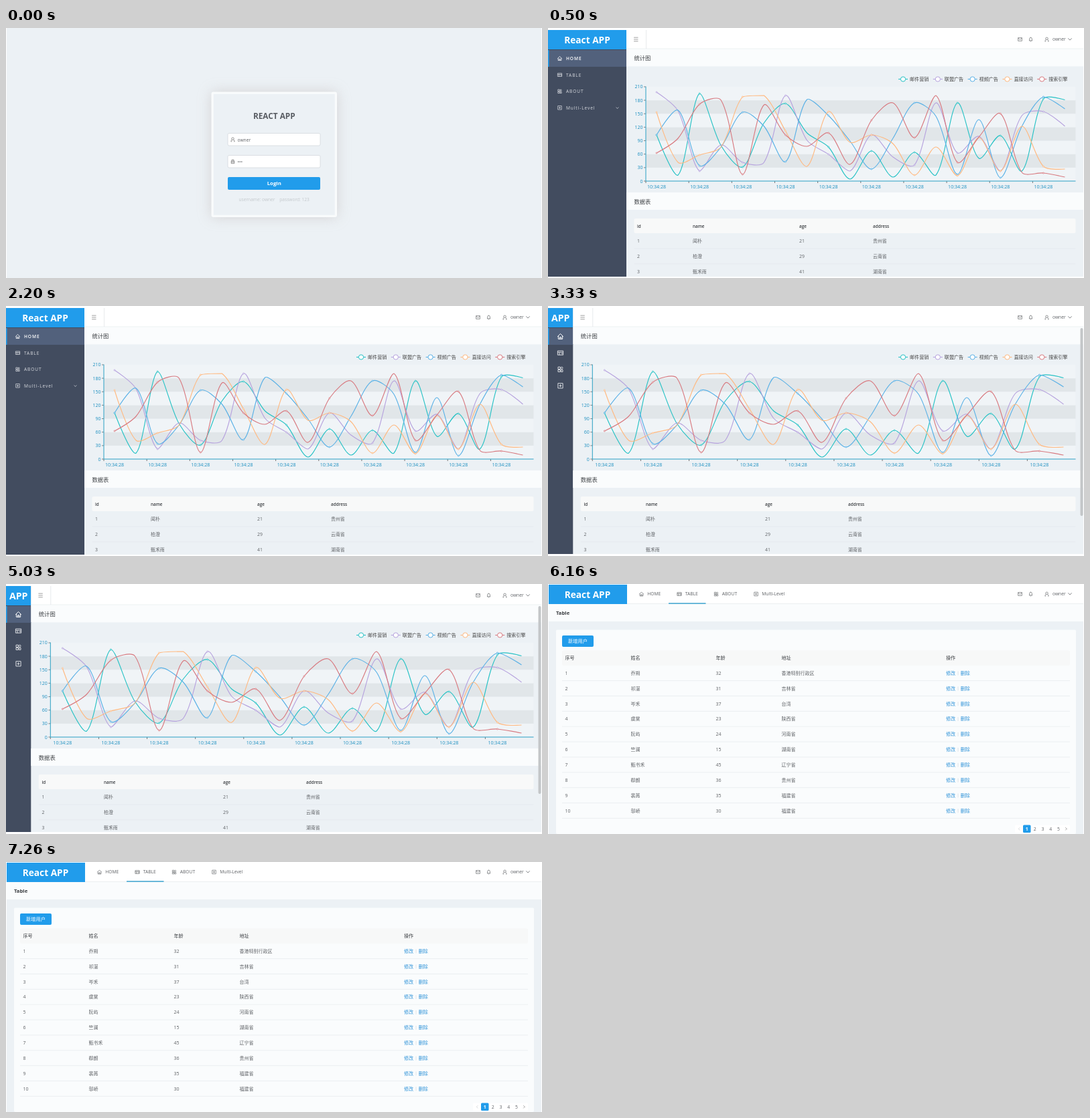
Animation, 800 px wide and 374 px high, one loop 8 s. Source, as an HTML page:

```html
<!DOCTYPE html>
<html lang="zh-CN">
<head>
<meta charset="utf-8">
<title>Dashboard</title>
<style>
html, body { margin: 0; width: 100%; height: 100%; overflow: hidden; background: #fff; }
svg { display: block; width: 100vw; height: 100vh; }
text { font-family: "Open Sans", "Noto Sans CJK SC", "Noto Sans CJK", sans-serif; white-space: pre; }
</style>
</head>
<body>
<svg id="stage" viewBox="0 0 800 374"></svg>
<script>
const BLUE = '#219ceb', BG = '#ecf1f5', PANEL = '#fafcfd', INK = '#5f6266', DARK = '#3c3f43';
const USER = 'owner';

const rect = (x, y, w, h, fill, extra = '') =>
  `<rect x="${x}" y="${y}" width="${w}" height="${h}" fill="${fill}" ${extra}/>`;
const text = (x, y, str, size = 6.7, fill = INK, extra = '') =>
  `<text x="${x}" y="${y}" font-size="${size}" fill="${fill}" ${extra}>${str}</text>`;
const line = (x1, y1, x2, y2, color, w = 0.7) =>
  `<path d="M${x1} ${y1}L${x2} ${y2}" stroke="${color}" stroke-width="${w}" fill="none"/>`;
const BOLD = 'font-weight="700"', SEMI = 'font-weight="600"', MEDIUM = 'font-weight="500"';
const MID = 'text-anchor="middle"', END = 'text-anchor="end"';

// Icons are drawn around 0,0 in a box of about 7 px
const ICONS = {
  home: 'M-3.4 .2L0-3.2L3.4 .2M-2.5-.5V3.1H2.5V-.5M-.8 3V.9H.8V3',
  table: 'M-3.3-2.4H3.3V2.5H-3.3ZM-3.3-.7H3.3M-1.2-.7V2.5M1 .9H3.3',
  about: 'M-2.8-2.8H-.2V-.2H-2.8ZM-2.8 .6H-.2V3H-2.8ZM.6-1.6A1.1 1.2 0 1 1 2.8-1.6A1.1 1.2 0 1 1 .6-1.6M.6 3V.6H2.8V3Z',
  plus: 'M-2.9-2.9H2.9V2.9H-2.9ZM-1.6 0H1.6M0-1.6V1.6',
  mail: 'M-3-2.5H3V2.5H-3ZM-3-2L0 .5L3-2',
  bell: 'M-2.7 2H2.7M-2 2V-.6A2 2.2 0 0 1 2-.6V2M-.7 3.1H.7M0-2.8V-3.5',
  user: 'M-1.8-1.2A1.8 1.9 0 1 1 1.8-1.2A1.8 1.9 0 1 1-1.8-1.2M-2.8 3.3Q-2.6 .7-1 .4M2.8 3.3Q2.6 .7 1 .4M-2.8 3.3H-1.7M2.8 3.3H1.7',
  lock: 'M-2.4-.8H2.4V3H-2.4ZM-1.5-.8V-2.8H1.5V-.8M-2.4 1H2.4',
  fold: 'M-3.2-2.8H3.2M-3.2 0H3.2M-3.2 2.8H3.2',
  down: 'M-2.4-1.2L0 1.3L2.4-1.2',
  left: 'M1-2L-1 0L1 2',
  right: 'M-1-2L1 0L-1 2'
};
const icon = (name, x, y, color = INK, s = 1, w = 0.7) =>
  `<path d="${ICONS[name]}" transform="translate(${x} ${y}) scale(${s})" fill="none" stroke="${color}" stroke-width="${w}"/>`;

const userBar = y =>
  icon('mail', 704.5, y, INK, .95) + icon('bell', 720.5, y, INK, .95) + icon('user', 744.5, y, INK, .95) +
  text(753, y + 2.4, USER, 6.7) + icon('down', 779, y - .3, INK, 1.1);

const band = (x, y, label) =>
  rect(x, y, 799 - x, 26, PANEL) + text(x + 11.5, y + 16.8, label, 8.3, DARK, MEDIUM);

function login() {
  const field = (y, name, value) =>
    rect(331, y, 138, 18.5, '#fff', 'rx="2" stroke="#d3d9dd" stroke-width=".8"') +
    icon(name, 338.5, y + 9.3, '#666', .95) + text(345.5, y + 12, value);
  return rect(1, 0, 798, 374, BG) +
    '<defs><filter id="soft" x="-30%" y="-30%" width="160%" height="160%"><feGaussianBlur stdDeviation="10"/></filter></defs>' +
    rect(306.5, 95.5, 187.5, 187.5, '#cac6c6', 'filter="url(#soft)" opacity=".7"') +
    rect(306.5, 95.5, 187.5, 187.5, '#f9fbfc', 'rx="3"') +
    rect(309.8, 98.8, 180.9, 180.9, BG) +
    text(400.3, 136.4, 'REACT APP', 11.8, '#595d63', BOLD + ' ' + MID) +
    field(157.5, 'user', USER) + field(190.5, 'lock', '•••') +
    rect(331, 223, 138, 19, BLUE, 'rx="2"') +
    text(400.3, 235.4, 'Login', 7.8, '#fff', BOLD + ' ' + MID) +
    text(347.5, 259.4, 'username: ' + USER, 6.6, '#c3c8cc') +
    text(408.3, 259.4, 'password: 123', 6.6, '#c3c8cc');
}

// Each series: name, color, heights on the stage
const SERIES = [
  ['邮件营销', '#27c2c5', [160, 220, 98, 176, 208, 142, 113, 157, 178, 226, 184, 223, 186, 220, 112, 195, 161, 214, 106, 107.5]],
  ['联盟广告', '#b6a2de', [96, 124, 214, 175, 201, 201, 101, 168, 189, 214, 160, 193, 205, 112, 187, 162, 214, 131, 125, 147]],
  ['视频广告', '#5ab1e6', [160, 123, 206, 178, 126, 147, 200, 107, 131, 169, 211, 165, 112, 132, 219, 137, 224, 147, 103, 121]],
  ['直接访问', '#ffb980', [126, 201, 190, 178, 103, 101, 154, 207, 125, 171, 160, 173, 220, 178, 221, 164, 214, 147, 207, 211]],
  ['搜索引擎', '#d87a80', [187, 165, 114, 108, 219, 115, 160, 177, 157, 204, 138, 112, 164, 101, 201, 163, 128, 216, 217, 223]]
];
const SMOOTH = 0.3;

// Smooth curve whose handles stay inside the range of the data
function curve(pts) {
  const ys = pts.map(p => p[1]), lo = Math.min(...ys), hi = Math.max(...ys);
  const clamp = y => Math.max(lo, Math.min(hi, y));
  const dist = (a, b) => Math.hypot(a[0] - b[0], a[1] - b[1]);
  let out = pts[0], d = 'M' + pts[0];
  for (let i = 1; i < pts.length; i++) {
    const a = pts[i - 1], p = pts[i], b = pts[i + 1];
    let into = p, next = p;
    if (b) {
      const k = dist(p, b) / (dist(a, p) + dist(p, b));
      const vx = (b[0] - a[0]) * SMOOTH, vy = (b[1] - a[1]) * SMOOTH;
      into = [p[0] - vx * (1 - k), clamp(p[1] - vy * (1 - k))];
      next = [p[0] + vx * k, clamp(p[1] + vy * k)];
    }
    d += `C${out} ${into} ${p}`;
    out = next;
  }
  return d;
}

function chart(left) {
  const right = 787.5, base = 229, step = (right - left) / 20, rise = 20.15, axis = '#1b8fc0';
  let s = '';
  for (let i = 0; i < 7; i++)
    s += rect(left, base - (i + 1) * rise, right - left, rise, i % 2 ? '#e1e6e9' : '#f0f4f7');
  for (let i = 0; i <= 7; i++) {
    const y = base - i * rise;
    s += line(left - 3, y, left, y, '#555') + text(left - 4.5, y + 2.5, i * 30, 7, axis, END);
  }
  for (let i = 0; i < 20; i += 2) {
    const x = left + i * step;
    s += line(x, base, x, base + 3, '#444') + text(x + step / 2, 240.3, '10:34:28', 7.05, axis, MID);
  }
  s += line(left, 87.5, left, base, '#2a9fc4', 1) + line(left, base, right, base, '#2a9fc4', 1);
  SERIES.forEach(([name, color, ys], n) => {
    const pts = ys.map((y, i) => [left + (i + .5) * step, y]);
    s += `<path d="${curve(pts)}" fill="none" stroke="${color}" stroke-width="1.15"/>`;
    pts.forEach(([x, y], i) => {
      if (i % 2 === 0) s += `<circle cx="${x}" cy="${y}" r="1" fill="#fff" stroke="${color}" stroke-width=".8"/>`;
    });
    const x = 523 + n * 51.8;
    s += line(x, 76.5, x + 14, 76.5, color, 1.1) +
      `<circle cx="${x + 7}" cy="76.5" r="3.6" fill="#fff" stroke="${color}" stroke-width="1"/>` +
      text(x + 17, 79.1, name, 7.1, '#444');
  });
  return s;
}

const MENU = [['home', 'HOME'], ['table', 'TABLE'], ['about', 'ABOUT'], ['plus', 'Multi-Level']];
const PEOPLE = [['1', '闻朴', '21', '贵州省'], ['2', '柏澄', '29', '云南省'], ['3', '甄禾雨', '41', '湖南省']];

function home(side, bottom, cols, small) {
  const edge = side + 29.5, left = side + 11.5;
  let s = rect(side, 3, 799 - side, bottom - 3, BG) +
    rect(0, 3, side, bottom - 3, '#424c5f') + rect(0, 3, side, 29, BLUE) +
    rect(0, 33, side, 25, '#52617c') + rect(0, 33, 1.6, 25, BLUE) +
    (small ? text(18.7, 22.8, 'APP', 14.2, '#fff', BOLD + ' ' + MID)
           : text(58.5, 22.8, 'React APP', 13.7, '#fff', BOLD + ' ' + MID));
  MENU.forEach(([name, label], i) => {
    const y = 45.5 + i * 24.6, color = i ? '#d8dbe0' : '#fff';
    s += icon(name, small ? 18.5 : 17.5, y, color, small ? 1.25 : .95, .8);
    if (!small) s += text(27, y + 2.5, label, 6.6, color, 'letter-spacing=".9" ' + (i ? MEDIUM : SEMI));
  });
  if (!small) s += icon('down', 103.5, 119.5, '#d8dbe0', .8, .9);
  s += rect(side, 3, 799 - side, 28, '#fff') + line(side, 31, 799, 31, '#e3e8eb') +
    line(edge, 3, edge, 31, '#dfe3e6') + icon('fold', side + 14.3, 17, '#777') + userBar(17) +
    band(side, 31.3, '统计图') + chart(edge - .5) + band(side, 246, '数据表') +
    rect(left, 285, 787.5 - left, 22, '#f8f9f9', 'rx="2"');
  ['id', 'name', 'age', 'address'].forEach((h, c) => s += text(cols[c], 298.6, h, 6.4, DARK, SEMI));
  PEOPLE.forEach((row, r) => {
    const y = 320.9 + r * 22.9;
    row.forEach((v, c) => s += text(cols[c], y, v, 6.9));
    if (r < 2) s += line(left, y + 9, 787.5, y + 9, '#e4e9ec');
  });
  if (small) s += rect(794.5, 33, 4, 281, '#c3c6c8', 'rx="2"');
  return s;
}

const ROWS = [
  ['乔朔', 32, '香港特别行政区'], ['祁湛', 31, '吉林省'], ['岑禾', 37, '台湾'], ['虞棠', 23, '陕西省'],
  ['阮屿', 24, '河南省'], ['竺澜', 15, '湖南省'], ['甄书禾', 45, '辽宁省'], ['郗朗', 36, '贵州省'],
  ['裴苒', 35, '福建省'], ['邬峤', 30, '福建省']
];

function table() {
  const cols = [25.5, 123.5, 250.5, 348.5, 594], menuX = [139.5, 196, 251, 310.5];
  let s = rect(1, 30, 798, 344, BG) + rect(1, 1, 117, 29, BLUE) +
    text(59, 20.6, 'React APP', 13.7, '#fff', BOLD + ' ' + MID);
  MENU.forEach(([name, label], i) =>
    s += icon(name, menuX[i], 15, INK, .95) + text(menuX[i] + 8.8, 17.4, label, 6.7));
  s += line(118, 29.6, 799, 29.6, '#e1e7ea') + rect(180, 28.3, 55.5, 1.5, '#3ba3cf') + userBar(15) +
    rect(1, 30, 798, 26, PANEL) + text(12, 46, 'Table', 7.7, DARK, BOLD) +
    rect(12, 68.5, 776, 305.5, PANEL, 'rx="2"') +
    rect(21, 77, 47, 17, BLUE, 'rx="2"') + text(44.5, 88.2, '新增用户', 7.2, '#fff', MID) +
    rect(21, 99.5, 758, 22.5, '#f7f8f8', 'rx="2"');
  ['序号', '姓名', '年龄', '地址', '操作'].forEach((h, c) => s += text(cols[c], 113.4, h, 7.1, DARK, MEDIUM));
  ROWS.forEach((row, r) => {
    const y = 135.8 + r * 22.87;
    [r + 1, ...row].forEach((v, c) => s += text(cols[c], y, v, 7));
    s += text(594, y, '修改', 7.1, '#2f93d8') + line(612, y - 5.2, 612, y + .6, '#d5dade') +
      text(615.7, y, '删除', 7.1, '#2f93d8') + line(21, y + 8.8, 779, y + 8.8, '#e5eaed');
  });
  s += rect(697, 360.5, 82, 11.5, '#fff', 'rx="1.5"') + icon('left', 703.3, 366.3, '#c5c9cc') +
    rect(709, 360.5, 11.5, 11.5, BLUE, 'rx="1.5"') + icon('right', 773.3, 366.3, '#777');
  for (let i = 0; i < 5; i++)
    s += text(714.8 + i * 11.8, 368.8, i + 1, 6.8, i ? INK : '#fff', MID + (i ? '' : ' ' + BOLD));
  return s;
}

const SCENES = [
  [0, login()],
  [500, home(117, 372, [133, 216, 375, 485], false)],
  [3330, home(37.3, 371, [53.5, 146, 324, 448], true)],
  [6160, table()]
];
const LOOP = 8000;

const stage = document.getElementById('stage');
stage.innerHTML = SCENES.map(([, body]) => `<g>${body}</g>`).join('');
const groups = [...stage.children];

function draw(ms) {
  const t = ms % LOOP;
  const now = SCENES.filter(([start]) => start <= t).length - 1;
  groups.forEach((g, i) => g.setAttribute('visibility', i === now ? 'visible' : 'hidden'));
}

const begin = performance.now();
function tick() {
  draw(performance.now() - begin);
  requestAnimationFrame(tick);
}
tick();
</script>
</body>
</html>
```
